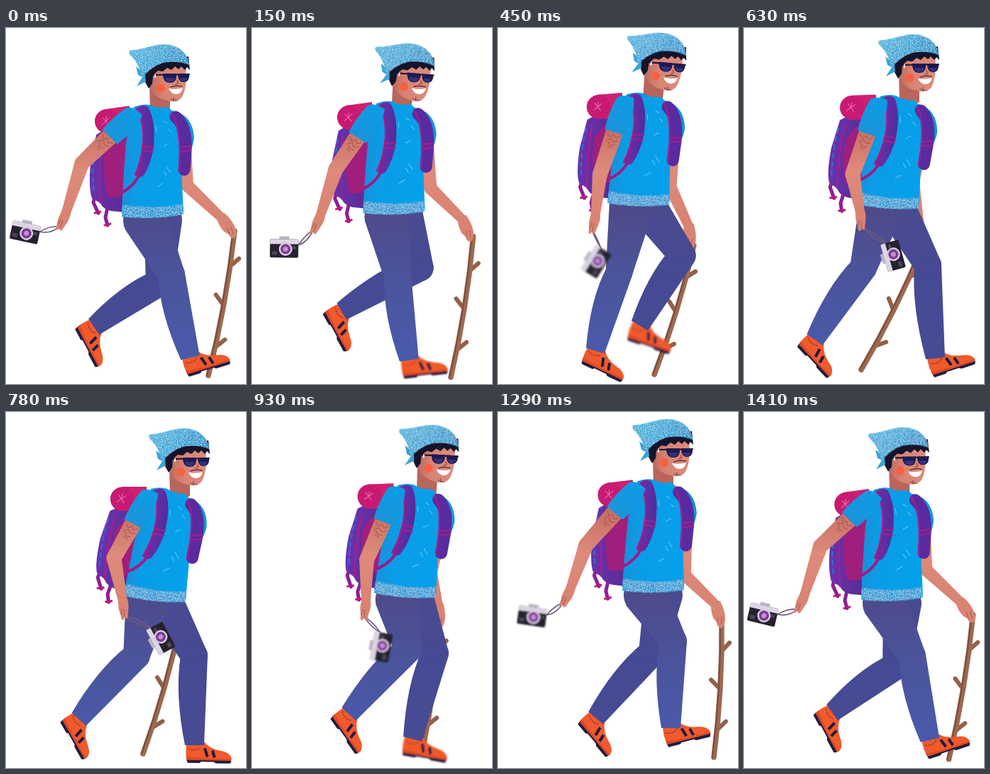
Write an HTML page that moves like this. It is 338 px wide and 500 px high and loops after 1440 ms.

```html
<!DOCTYPE html>
<html lang="en">
<head>
<meta charset="utf-8">
<title>Walking hiker</title>
<style>
html, body { margin: 0; width: 100%; height: 100%; overflow: hidden; background: #fff; }
svg { display: block; width: 100vw; height: 100vh; }
</style>
</head>
<body>
<svg viewBox="0 0 338 500" fill="none" stroke-linecap="round" stroke-linejoin="round">
  <defs>
    <linearGradient id="pantsNear" gradientUnits="userSpaceOnUse" x1="0" y1="255" x2="0" y2="460">
      <stop offset="0" stop-color="#4e4a8a"/><stop offset=".4" stop-color="#4b539a"/><stop offset="1" stop-color="#4a5aab"/>
    </linearGradient>
    <linearGradient id="pantsFar" gradientUnits="userSpaceOnUse" x1="0" y1="255" x2="0" y2="460">
      <stop offset="0" stop-color="#4a4a90"/><stop offset=".5" stop-color="#454a94"/><stop offset="1" stop-color="#474b93"/>
    </linearGradient>
    <linearGradient id="shirt" x1="0" y1="0" x2="1" y2=".1">
      <stop offset="0" stop-color="#1c8dd6"/><stop offset=".3" stop-color="#0b9ce6"/><stop offset="1" stop-color="#05a0ea"/>
    </linearGradient>
    <linearGradient id="cuff" x1="1" y1="0" x2="0" y2="0">
      <stop offset="0" stop-color="#1c94da"/><stop offset="1" stop-color="#0b9ce6"/>
    </linearGradient>
    <linearGradient id="scarf" x1="0" y1="0" x2="1" y2=".6">
      <stop offset="0" stop-color="#4fb4de"/><stop offset=".5" stop-color="#3ba5d6"/><stop offset="1" stop-color="#2589c4"/>
    </linearGradient>
    <linearGradient id="skin" gradientUnits="userSpaceOnUse" x1="0" y1="140" x2="0" y2="290">
      <stop offset="0" stop-color="#c66f64"/><stop offset=".4" stop-color="#de8b7b"/><stop offset="1" stop-color="#d8806f"/>
    </linearGradient>
    <linearGradient id="face" x1="0" y1="0" x2="1" y2="0">
      <stop offset="0" stop-color="#c06c62"/><stop offset=".35" stop-color="#d88475"/><stop offset="1" stop-color="#dd8b7b"/>
    </linearGradient>
    <linearGradient id="strap" x1="0" y1="0" x2="1" y2="0">
      <stop offset="0" stop-color="#8a2098"/><stop offset=".5" stop-color="#602ea4"/><stop offset="1" stop-color="#502c98"/>
    </linearGradient>
    <linearGradient id="pack" x1="0" y1="0" x2="1" y2="0">
      <stop offset="0" stop-color="#6a32b0"/><stop offset="1" stop-color="#542889"/>
    </linearGradient>
    <filter id="grain">
      <feTurbulence type="fractalNoise" baseFrequency=".8" numOctaves="2" seed="4"/>
      <feColorMatrix values="0 0 0 0 .65  0 0 0 0 .88  0 0 0 0 .96  3 0 0 0 -1.4"/>
      <feComposite in2="SourceGraphic" operator="in" result="specks"/>
      <feMerge><feMergeNode in="SourceGraphic"/><feMergeNode in="specks"/></feMerge>
    </filter>
    <filter id="blurNear"><feGaussianBlur/></filter>
    <filter id="blurFar"><feGaussianBlur/></filter>
    <filter id="blurCam"><feGaussianBlur/></filter>
    <g id="shoe">
      <path fill="#f05a2c" d="M-11-5H13Q20 4 35 7Q50 9 52 18L51 22H-11Q-14 8-11-5Z"/>
      <path fill="#df4822" d="M-12 16Q15 20 52 18L51 22H-11Z"/>
      <path fill="#201c40" d="M-11 21H52L50 25H30L27 23H9L7 25H-10Z"/>
      <path stroke="#201c40" stroke-width="4" stroke-linecap="butt" d="M14 4L18 16M25 7L28 17"/>
      <path stroke="#7d2a22" stroke-dasharray="2 2" d="M-9 5Q0 9 8 3"/>
    </g>
  </defs>

  <path id="farUpper" fill="url(#skin)"/>
  <path id="farFore" fill="url(#skin)"/>
  <g id="stick">
    <path id="knobs" stroke="#94604a" stroke-width="6"/>
    <path id="rod" stroke="#9c6a50" stroke-width="7.5"/>
    <path id="rodShade" stroke="#7c4d3e" stroke-width="2"/>
  </g>
  <g id="farHand">
    <path fill="#d98473" d="M-4-7Q10-10 22-7Q33-3 33 3Q30 8 24 6L17 9Q6 10-4 6Z"/>
    <path stroke="#a95a4d" d="M18-3L28 1M16 2L25 5"/>
  </g>

  <g filter="url(#blurFar)"><use id="farShoe" href="#shoe"/></g>
  <path id="farShin" fill="url(#pantsFar)"/>
  <path id="farThigh" fill="url(#pantsFar)"/>
  <g filter="url(#blurNear)"><use id="nearShoe" href="#shoe"/></g>
  <path id="nearShin" fill="url(#pantsNear)"/>
  <path id="nearThigh" fill="url(#pantsNear)"/>

  <g id="bag">
    <path stroke="#8a2098" stroke-width="5" d="M126 234L123 245L130 260M143 252L140 266L143 277"/>
    <path stroke="#c01778" stroke-width="3" d="M125 260L133 258M139 277L147 275"/>
    <path fill="url(#pack)" d="M127 150Q150 134 185 125L182 260L148 257Q136 254 133 246L121 239Q116 225 119 190Z"/>
    <path fill="#a01f7c" d="M150 158L176 146L172 236L144 238Q136 215 138 176Z"/>
    <path stroke="#b81a80" stroke-width="2" d="M134 158Q130 200 133 246"/>
    <path stroke="#2f73d0" stroke-width="2" stroke-dasharray="6 6" d="M126 162Q120 200 124 232"/>
    <path stroke="#d0206f" stroke-width="34" stroke-linecap="butt" d="M141 131L176 126"/>
    <circle cx="142" cy="131" r="17" fill="#c81a72"/>
    <path stroke="#ee75b0" d="M136 126L145 136M146 126L135 136M141 124V132"/>
  </g>

  <g id="head">
    <path fill="#b9655c" d="M202 78L203 116Q216 126 231 118L231 96Z"/>
    <path fill="url(#face)" d="M205 52H253Q256 82 248 97Q241 106 228 102Q211 99 204 87Z"/>
    <circle cx="218" cy="84" r="6" fill="#f8603f"/>
    <path fill="#14142b" d="M192 62L214 44L257 40L259 59L255 55L252 59L247 54L243 58L238 54L233 59L227 56L221 61L214 60L207 66L206 78L201 85L196 76Z"/>
    <path stroke="#17163a" stroke-width="2.2" d="M208 66L258 65"/>
    <path fill="#1d1a50" d="M221 64H240Q241 77 231 77Q221 77 221 64ZM242 64H258Q259 76 250 76Q242 76 242 64Z"/>
    <path fill="#35317c" d="M224 70H238Q236 76 231 76Q226 76 224 70ZM244 70H256Q254 75 250 75Q246 75 244 70Z"/>
    <path stroke="#fff" stroke-width="2" d="M210 66V69"/>
    <path stroke="#a34c42" stroke-width="1.5" d="M241 74Q245 78 239 79"/>
    <path stroke="#4a2432" stroke-width="1.3" stroke-dasharray="3 1" d="M232 83Q240 80 248 82"/>
    <path fill="#fff" d="M229 85Q240 87 249 84Q247 93 239 93Q232 92 229 85Z"/>
    <path stroke="#5a3038" stroke-width="1.2" stroke-dasharray="1 2" d="M232 100L241 102M236 98V102"/>
    <path fill="#3ba3d4" d="M193 62L183 54L186 66L192 69L184 82L197 75L196 66Z"/>
    <path fill="url(#scarf)" filter="url(#grain)" d="M173 32Q194 29 211 24Q234 20 247 31Q257 39 258 52Q240 45 221 49Q203 55 192 70Q187 48 174 37Z"/>
  </g>

  <g id="torso">
    <path fill="#0f96e0" d="M234 116Q262 121 265 153Q263 174 252 182L238 160Z"/>
    <path fill="url(#shirt)" d="M180 111Q192 106 203 108Q214 114 228 111L244 125Q247 160 246 180L250 258Q207 270 163 264Q164 225 169 160Z"/>
    <path fill="#2c98d4" filter="url(#grain)" d="M164 248Q207 255 249 247L250 262Q207 270 163 265Z"/>
    <path stroke="#6cc8f2" d="M211 137L212 145M222 131L227 134M229 142L233 146M222 166L229 162M226 195L232 203M222 201L226 207M213 223L221 218"/>
    <path stroke="#5a2a9f" stroke-width="17" d="M239 125Q255 138 253 172L251 199"/>
    <path stroke="#9c1f8c" stroke-width="2.5" d="M233 120Q248 140 244 202M246 168L260 166M246 174L260 172"/>
    <path fill="url(#strap)" d="M184 113Q192 106 200 111Q211 130 208 165Q205 190 194 207Q188 212 181 206Q192 180 193 155Q193 130 184 113Z"/>
    <path stroke="#a01a86" stroke-width="4" d="M187 208Q178 224 163 231"/>
    <path stroke="#b01a84" stroke-width="2" d="M192 166L208 167M191 172L207 174M184 113Q195 135 193 160Q191 186 182 206"/>
  </g>

  <path id="nearFore" fill="url(#skin)"/>
  <path id="nearUpper" fill="url(#skin)"/>
  <g id="sleeve">
    <path stroke="#a24a48" stroke-width=".8" d="M47-9L52-5L48 0L53 4L49 9M55-9L58-3L54 2L60 7M62-6L64 0L60 4M67-4L66 3"/>
    <path fill="url(#cuff)" d="M-10-10Q10-19 44-15L45 14Q25 17 0 13Q-10 10-10-10Z"/>
  </g>
  <path id="cord" stroke="#6f5a80" stroke-width="1.6"/>
  <g id="nearHand">
    <path fill="#d98473" d="M-4-6Q6-8 13-6L27-2Q29 1 25 2L29 5Q28 8 22 7L12 8L-4 6Z"/>
    <path stroke="#a95a4d" d="M14 1L25 2M13 4L21 6"/>
  </g>
  <g filter="url(#blurCam)"><g id="camera">
    <rect x="-7" y="-17" width="14" height="7" rx="1" fill="#bcb4c6"/>
    <rect x="-20" y="-13" width="40" height="26" rx="2" fill="#25222f"/>
    <path fill="#dcd6e2" d="M-18-13H18Q20-13 20-11V-6H-20V-11Q-20-13-18-13Z"/>
    <rect x="-17" y="4" width="7" height="5" fill="#4b4658"/>
    <rect x="11" y="-3" width="6" height="4" fill="#4b4658"/>
    <circle cx="2" cy="1" r="9.5" fill="#d7c9df"/>
    <circle cx="2" cy="1" r="7" fill="#7c3a94"/>
    <circle cx="2" cy="1" r="3.5" fill="#c48fd2"/>
  </g></g>
</svg>
<script>
const LOOP = 1440, STEP = 30;
const times = [0, 300, 630, 780, 1080, 1290];
const bodyTimes = [0, 300, 510, 630, 780, 1080, 1290];

// Body offsets from the rest pose
const hem = { x: [0, -10, -4, 3, 13, 12], y: [0, -12, -17, -13, -1, -13, -13] };
const tilt = [0, 2, 6, 8, 4, 1.5];
const face = { x: [0, -1, 16, 28, 31, 16], y: [0, -4, -18, -14, 0, -10, -13] };
const nod = [0, 8, 0, 0, 6, 0];

const nearArm = {
  elbow: { x: [107, 133, 153, 152, 165, 124], y: [190, 205, 205, 205, 207, 187] },
  wrist: { x: [85, 115, 163, 164, 150, 102], y: [258, 265, 256, 263, 262, 248] }
};
const cam = { x: [27, 80, 210, 218, 134, 48], y: [287, 329, 320, 318, 335, 287] };
const camTurn = [12, -20, -106, -118, -35, 8];

const farArm = {
  elbow: { x: [255, 248, 238, 246, 257, 263], y: [221, 228, 215, 215, 235, 229] },
  wrist: { x: [304, 286, 248, 245, 283, 307], y: [267, 273, 285, 278, 268, 271] }
};
const rodTop = { x: [322, 296, 252, 247, 288, 315], y: [285, 301, 306, 290, 283, 288] };
const rodEnd = { x: [285, 267, 165, 193, 283, 304], y: [488, 491, 480, 480, 477, 485] };

const nearLeg = {
  knee: { x: [233, 181, 168, 184, 251, 247], y: [346, 348, 337, 342, 325, 322] },
  ankle: { x: [260, 176, 100, 103, 178, 244], y: [463, 464, 438, 432, 422, 444] },
  turn: [-17, 8, 47, 60, 40, -14]
};
const farLeg = {
  knee: { x: [216, 256, 259, 265, 246, 217], y: [358, 316, 333, 342, 335, 338] },
  ankle: { x: [124, 145, 270, 266, 183, 138], y: [420, 389, 464, 468, 448, 430] },
  turn: [62, 50, -18, 1, 20, 50]
};

const el = {};
document.querySelectorAll('[id]').forEach(n => el[n.id] = n);
const set = (id, name, value) => el[id].setAttribute(name, value);

// Periodic cubic through uneven keys
function at(vals, t, ts = times) {
  const n = ts.length, wrap = i => (i + n) % n;
  const when = i => ts[wrap(i)] + LOOP * Math.floor(i / n);
  t = (t + LOOP) % LOOP;
  let i = n - 1;
  while (ts[i] > t) i--;
  const v = k => vals[wrap(k)];
  const slope = k => (v(k + 1) - v(k - 1)) / (when(k + 1) - when(k - 1));
  const h = when(i + 1) - when(i), u = (t - when(i)) / h, w = 1 - u;
  return v(i) * w * w * (1 + 2 * u) + v(i + 1) * u * u * (3 - 2 * u)
    + h * u * w * (slope(i) * w - slope(i + 1) * u);
}
const point = (track, t) =>
  [at(track.x, t), at(track.y, t, track.y.length === 7 ? bodyTimes : times)];
const angle = (a, b) => Math.atan2(b[1] - a[1], b[0] - a[0]) * 180 / Math.PI;
const place = (p, deg) => `translate(${p[0]} ${p[1]}) rotate(${deg})`;
const mix = (a, b, f) => [a[0] + (b[0] - a[0]) * f, a[1] + (b[1] - a[1]) * f];

function turn([x, y], deg) {
  const r = deg * Math.PI / 180, c = Math.cos(r), s = Math.sin(r);
  return [x * c - y * s, x * s + y * c];
}

// Maps a fraction along a-b and a sideways offset to a point
function along(a, b) {
  const dx = b[0] - a[0], dy = b[1] - a[1], len = Math.hypot(dx, dy) || 1;
  return (f, off) => `${a[0] + dx * f - dy / len * off} ${a[1] + dy * f + dx / len * off}`;
}

function limb(a, b, ra, rb) {
  const on = along(a, b);
  return `M${on(0, ra)}L${on(1, rb)}A${rb} ${rb} 0 0 0 ${on(1, -rb)}L${on(0, -ra)}A${ra} ${ra} 0 0 0 ${on(0, ra)}Z`;
}

// Lower leg with a rounded calf and a flat cuff
function shin(a, b) {
  const on = along(a, b);
  return `M${on(0, 19)}Q${on(.42, 28)} ${on(1, 14)}L${on(1, -13)}L${on(0, -19)}A19 19 0 0 0 ${on(0, 19)}Z`;
}

function blur(id, track, t) {
  const a = point(track, t - 15), b = point(track, t + 15);
  const speed = Math.hypot(b[0] - a[0], b[1] - a[1]) / 30;
  el[id].firstElementChild.setAttribute('stdDeviation', Math.min(1.4, Math.max(0, speed - .14) * 5));
}

function drawLeg(side, leg, hip, hipR, t) {
  const knee = point(leg.knee, t), ankle = point(leg.ankle, t);
  set(side + 'Thigh', 'd', limb(hip, knee, hipR, 19));
  set(side + 'Shin', 'd', shin(knee, ankle));
  set(side + 'Shoe', 'transform', place(ankle, at(leg.turn, t)));
}

function drawStick(t) {
  const top = point(rodTop, t), on = along(top, point(rodEnd, t));
  const line = s => `M${on(0, s)}Q${on(.5, s - 7)} ${on(1, s)}`;
  const knob = (f, off) => `M${on(f + .06, -3)}L${on(f, off)}`;
  set('rod', 'd', line(0));
  set('rodShade', 'd', line(2));
  set('knobs', 'd', knob(.18, -13) + knob(.45, 10) + knob(.74, -14));
  return top;
}

function draw(t) {
  const shift = point(hem, t), lean = at(tilt, t);
  const base = [207 + shift[0], 262 + shift[1]];
  const onBody = (x, y) => {
    const p = turn([x - 207, y - 262], lean);
    return [base[0] + p[0], base[1] + p[1]];
  };
  const body = place(base, lean) + ' translate(-207 -262)';
  set('torso', 'transform', body);
  set('bag', 'transform', body);

  const f = point(face, t);
  set('head', 'transform', place([240 + f[0], 70 + f[1]], at(nod, t)) + ' translate(-240 -70)');

  drawLeg('near', nearLeg, [base[0] - 11, base[1] + 8], 31, t);
  drawLeg('far', farLeg, [base[0] + 14, base[1] + 8], 27, t);

  const farElbow = point(farArm.elbow, t), farWrist = point(farArm.wrist, t);
  set('farUpper', 'd', limb(onBody(249, 140), farElbow, 10, 9));
  set('farFore', 'd', limb(farElbow, farWrist, 9, 6.5));
  set('farHand', 'transform', place(farWrist, angle(farWrist, drawStick(t)) + 8));

  const shoulder = onBody(178, 122);
  const elbow = point(nearArm.elbow, t), wrist = point(nearArm.wrist, t);
  set('nearUpper', 'd', limb(mix(shoulder, elbow, .3), elbow, 12.5, 10.5));
  set('nearFore', 'd', limb(elbow, wrist, 10.5, 6.5));
  set('sleeve', 'transform', place(shoulder, angle(shoulder, elbow)));
  const handTurn = angle(elbow, wrist);
  set('nearHand', 'transform', place(wrist, handTurn));

  const c = point(cam, t), spin = at(camTurn, t);
  set('camera', 'transform', place(c, spin));
  const grip = turn([23, 3], handTurn), ring = turn([20, -5], spin);
  const g = [wrist[0] + grip[0], wrist[1] + grip[1]], r = [c[0] + ring[0], c[1] + ring[1]];
  const [mx, my] = mix(g, r, .5);
  set('cord', 'd', `M${g}Q${mx} ${my - 5} ${r}M${g}Q${mx + 2} ${my + 7} ${r}`);

  blur('blurNear', nearLeg.ankle, t);
  blur('blurFar', farLeg.ankle, t);
  blur('blurCam', cam, t);
}

const start = performance.now();
function tick() {
  const t = (performance.now() - start) % LOOP;
  draw(Math.floor(t / STEP) * STEP);
  requestAnimationFrame(tick);
}
tick();
</script>
</body>
</html>
```
